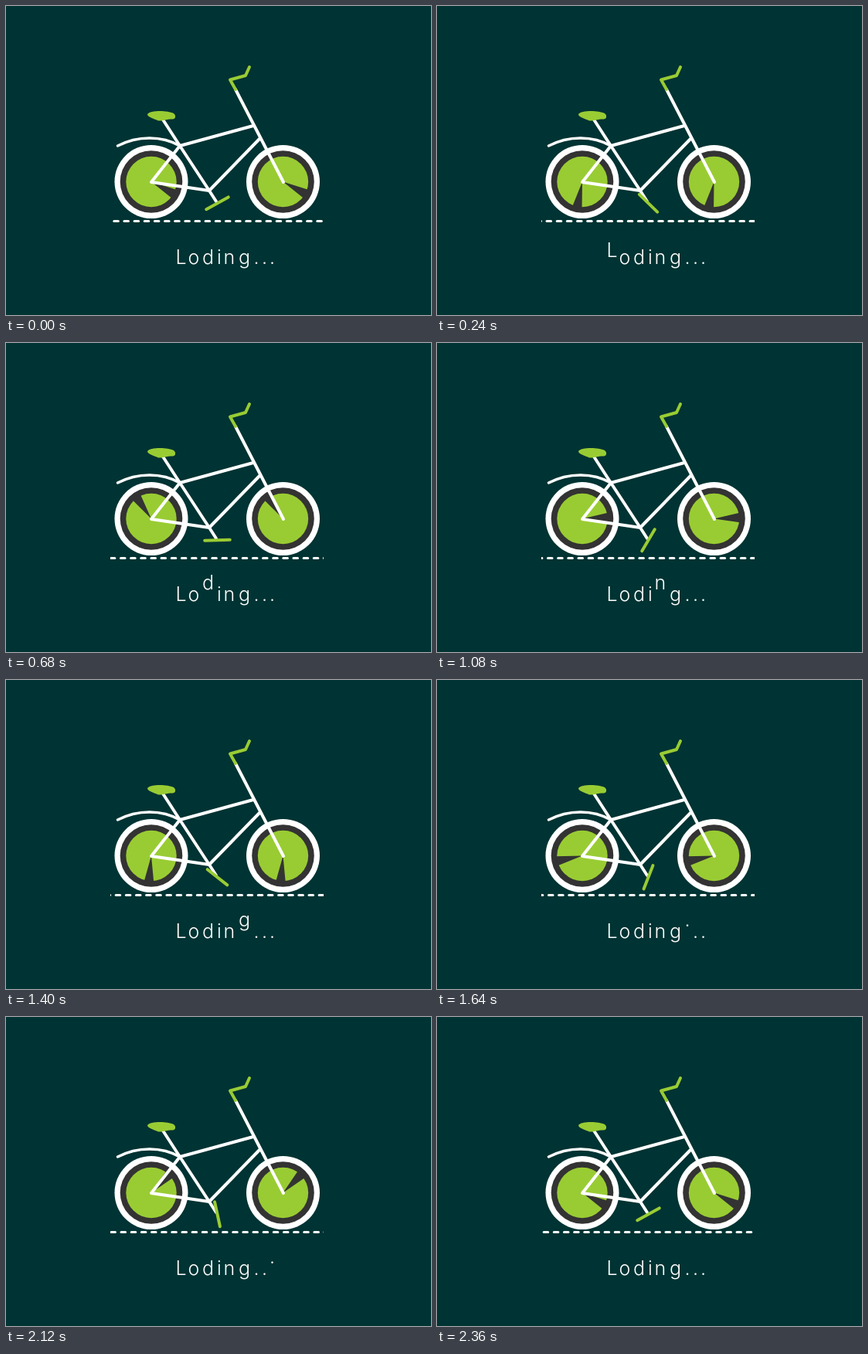
Animation of 550x400 px, one loop 2400 ms. Source, as an HTML page with a canvas:

```html
<!DOCTYPE html>
<html lang="en">
<head>
<meta charset="utf-8">
<title>Loding</title>
<style>
  html, body { margin: 0; width: 100%; height: 100%; overflow: hidden; background: #033; }
  canvas { display: block; }
</style>
</head>
<body>
<canvas id="stage" width="550" height="400"></canvas>
<script>
const ctx = document.getElementById('stage').getContext('2d');
const GREEN = '#9c3', DARK = '#333', WHITE = '#fff', BACK = '#033';
const LOOP = 2400, STEP = 40, TURNS = 2, LAST = LOOP / STEP - 1;
const rad = deg => deg * Math.PI / 180;

const GROUND = { left: 135, right: 411, y: 278.5, start: 138.3, period: 13.15, dash: 8.5, speed: 1.81 };
const LETTERS = [...'Loding...'];
const LETTER_X = [219.5, 235.5, 254, 273, 281.5, 301, 320.5, 331, 341];
const BASELINE = 334;
const HOP = { every: 6, first: 1, height: 17.3 };

function disc(x, y, r, color) {
  ctx.fillStyle = color;
  ctx.beginPath();
  ctx.arc(x, y, r, 0, 2 * Math.PI);
  ctx.fill();
}

function line(color, width, ...points) {
  ctx.strokeStyle = color;
  ctx.lineWidth = width;
  ctx.beginPath();
  points.forEach(([x, y]) => ctx.lineTo(x, y));
  ctx.stroke();
}

function wheel(x, y, angle) {
  disc(x, y, 47.5, WHITE);
  disc(x, y, 40.3, DARK);
  disc(x, y, 32.7, GREEN);
  ctx.fillStyle = DARK;
  ctx.beginPath();
  ctx.moveTo(x, y);
  ctx.arc(x, y, 34, angle - rad(10.5), angle + rad(10.5));
  ctx.fill();
}

function bike(spin) {
  const hub = [188, 228], seat = [225, 181], crank = [263, 239];
  wheel(188, 227.5, rad(28) + spin);
  wheel(358.5, 227.5, rad(28) + spin);

  ctx.strokeStyle = WHITE;
  ctx.lineWidth = 3.5;
  ctx.beginPath();
  ctx.moveTo(144.5, 181);
  ctx.bezierCurveTo(170, 167.5, 202, 167.5, ...seat);
  ctx.stroke();

  line(WHITE, 4, [203, 147], seat, crank, [272, 253]);
  line(WHITE, 4, seat, hub, crank);
  line(WHITE, 4, seat, [320, 155]);
  line(WHITE, 4, crank, [329, 171]);
  line(WHITE, 4, [297, 108], [359, 228]);
  line(GREEN, 4, [297, 108], [290, 95.5], [310, 90], [315, 79]);

  ctx.fillStyle = GREEN;
  ctx.beginPath();
  ctx.moveTo(183, 140);
  ctx.bezierCurveTo(186, 135, 208, 134.5, 217, 139);
  ctx.bezierCurveTo(220, 141, 220, 146, 216, 146.5);
  ctx.bezierCurveTo(206, 146.5, 203, 149, 197, 148.5);
  ctx.bezierCurveTo(192, 146, 183, 144, 183, 140);
  ctx.fill();

  const tilt = rad(-29) + spin;
  const dx = 16.3 * Math.cos(tilt), dy = 16.3 * Math.sin(tilt);
  line(GREEN, 4, [273.5 - dx, 255.3 - dy], [273.5 + dx, 255.3 + dy]);
}

function ground(frame) {
  const { left, right, y, start, period, dash, speed } = GROUND;
  ctx.save();
  ctx.beginPath();
  ctx.rect(left, y - 5, right - left, 10);
  ctx.clip();
  const shift = (frame * speed) % period;
  for (let x = start - shift - period; x < right; x += period) {
    line(WHITE, 3, [x + 1.5, y], [x + dash - 1.5, y]);
  }
  ctx.restore();
}

function label(frame) {
  ctx.fillStyle = WHITE;
  ctx.font = '300 25px Inter, "Open Sans", sans-serif';
  LETTERS.forEach((letter, i) => {
    const phase = (frame - HOP.first - i * HOP.every) / HOP.every;
    const lift = phase > 0 && phase < 1 ? HOP.height * Math.sin(Math.PI * phase) : 0;
    ctx.fillText(letter, LETTER_X[i], BASELINE - lift);
  });
}

function draw() {
  const frame = Math.floor((performance.now() % LOOP) / STEP);
  ctx.fillStyle = BACK;
  ctx.fillRect(0, 0, 550, 400);
  ctx.lineCap = ctx.lineJoin = 'round';
  bike(rad(360 * TURNS) * frame / LAST);
  ground(frame);
  label(frame);
  requestAnimationFrame(draw);
}
draw();
</script>
</body>
</html>
```
